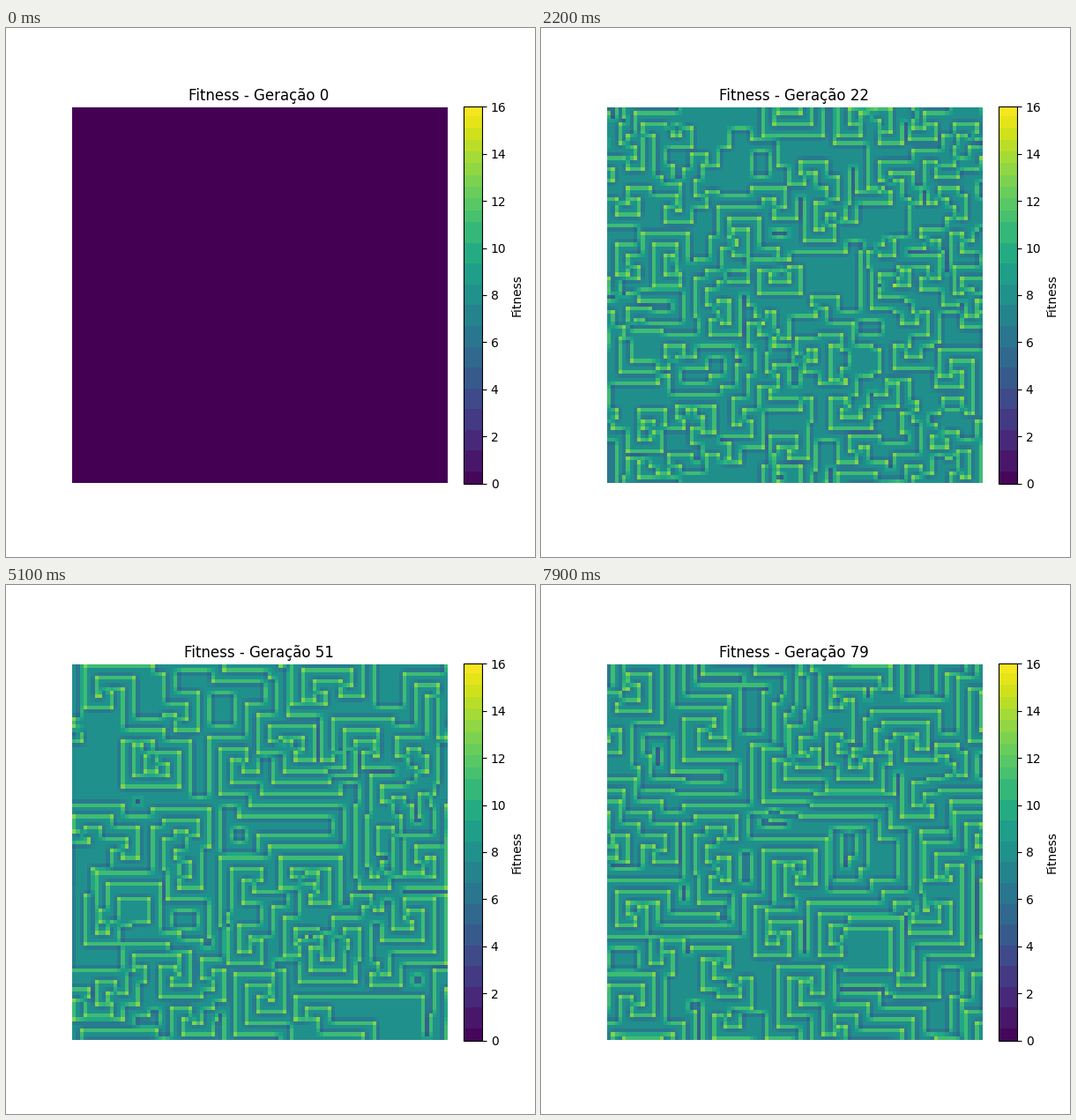
A matplotlib script that plays this animation: 600 by 600 pixels, repeating every 8 s.

```python
import matplotlib.pyplot as plt
import numpy as np
from matplotlib.animation import FuncAnimation
from matplotlib.cm import ScalarMappable
from matplotlib.colors import BoundaryNorm, ListedColormap

SIZE = 100
GENERATIONS = 80
INTERVAL = 100
TOP = 16
DRAW, WIN, LOSS = 1, 2, 0.5

# the cell itself comes first, so that it wins ties
OFFSETS = [(0, 0)] + [(i, j) for i in (-1, 0, 1) for j in (-1, 0, 1) if (i, j) != (0, 0)]


def neighbour(grid, offset):
    return np.roll(grid, (-offset[0], -offset[1]), axis=(0, 1))


def score(grid):
    """Rock-paper-scissors against the 8 neighbours on a torus."""
    payoff = np.array([DRAW, WIN, LOSS])
    return sum(payoff[(grid - neighbour(grid, o)) % 3] for o in OFFSETS[1:])


def imitate(grid, fitness):
    """Every cell copies the fittest cell of its neighbourhood."""
    scores = np.stack([neighbour(fitness, o) for o in OFFSETS])
    kinds = np.stack([neighbour(grid, o) for o in OFFSETS])
    best = scores.argmax(axis=0)
    return np.take_along_axis(kinds, best[None], axis=0)[0]


def evolve(seed=42):
    rng = np.random.RandomState(seed)
    grid = rng.randint(0, 3, (SIZE, SIZE))
    history = [np.zeros((SIZE, SIZE))]
    while len(history) < GENERATIONS:
        fitness = score(grid)
        history.append(fitness)
        grid = imitate(grid, fitness)
    return history


def banded_scale():
    """Viridis in flat steps for the colour bar, finer towards the top."""
    edges = np.r_[0, np.arange(0.53, 11.2, 0.88), np.arange(11.6, 15.9, 0.5), TOP]
    mids = (edges[:-1] + edges[1:]) / 2
    colors = plt.get_cmap("viridis")(mids / TOP)
    return ScalarMappable(BoundaryNorm(edges, len(mids)), ListedColormap(colors))


history = evolve()

fig, ax = plt.subplots(figsize=(6, 6), dpi=100)
image = ax.imshow(history[0], cmap="viridis", vmin=0, vmax=TOP)
ax.axis("off")
title = ax.set_title("Fitness - Geração 0", x=0.498)

bar = fig.colorbar(banded_scale(), ax=ax, fraction=0.046, pad=0.04,
                   spacing="proportional", ticks=range(0, TOP + 1, 2), label="Fitness")
bar.minorticks_off()


def update(gen):
    image.set_data(history[gen])
    title.set_text(f"Fitness - Geração {gen}")
    return image, title


anim = FuncAnimation(fig, update, frames=GENERATIONS, interval=INTERVAL,
                     repeat=True, repeat_delay=0, blit=False)
plt.show()
```
